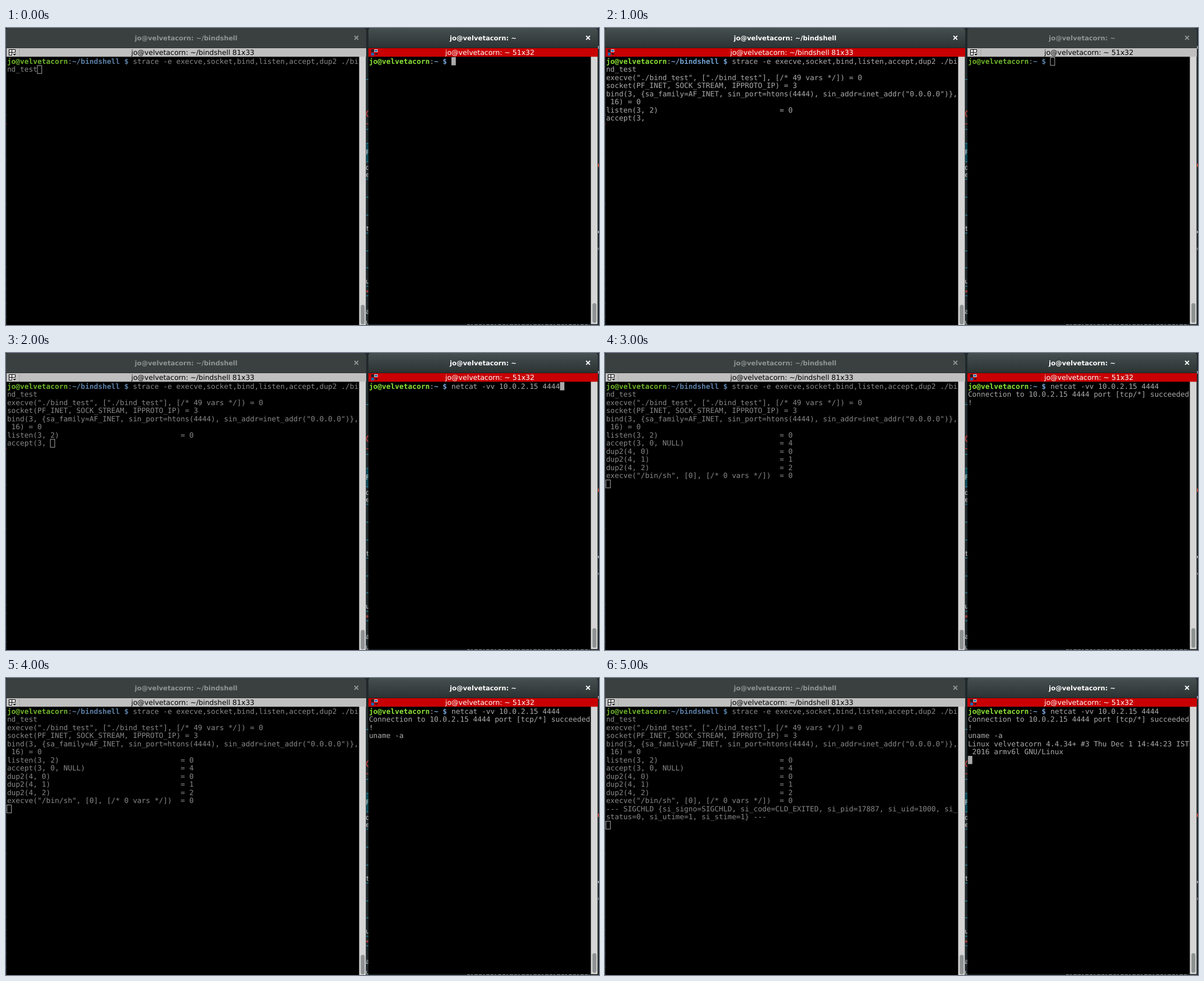
An HTML page for the animation above (6000 ms loop, 1057 by 530 pixels).

```html
<!DOCTYPE html>
<html lang="en">
<head>
<meta charset="utf-8">
<title>Bind shell</title>
<style>
html, body { margin: 0; width: 100%; height: 100%; overflow: hidden; background: #20282b; }
svg { display: block; width: 1057px; height: 530px; }
text { white-space: pre; text-rendering: geometricPrecision; }
.mono { font: 12.856px "DejaVu Sans Mono", monospace; fill: #aaa; }
.user { font-weight: bold; fill: #8ae234; }
.path { font-weight: bold; fill: #729fcf; }
.title { font: bold 11.6px "DejaVu Sans", sans-serif; text-anchor: middle; }
.sub { font: 12.5px "DejaVu Sans", sans-serif; text-anchor: middle; }
.desk { font: 12px "DejaVu Sans Mono", monospace; fill: #c8cccc; }

/* hN stays visible for N seconds, beginning at second --at */
.h1, .h2, .h3, .h4, .h5, .d1, .d5 {
  animation: 6s step-end calc((var(--at) - 6) * 1s) infinite;
}
.h1 { animation-name: h1; }
.h2 { animation-name: h2; }
.h3 { animation-name: h3; }
.h4 { animation-name: h4; }
.h5 { animation-name: h5; }
.d1 { animation-name: d1; }
.d5 { animation-name: d5; }
@keyframes h1 { 0% { visibility: visible } 16.6666%, 100% { visibility: hidden } }
@keyframes h2 { 0% { visibility: visible } 33.3333%, 100% { visibility: hidden } }
@keyframes h3 { 0% { visibility: visible } 50%, 100% { visibility: hidden } }
@keyframes h4 { 0% { visibility: visible } 66.6666%, 100% { visibility: hidden } }
@keyframes h5 { 0% { visibility: visible } 83.3333%, 100% { visibility: hidden } }
@keyframes d1 { 0% { opacity: .8 } 16.6666%, 100% { opacity: 1 } }
@keyframes d5 { 0% { opacity: .8 } 83.3333%, 100% { opacity: 1 } }
</style>
</head>
<body>
<svg id="stage" viewBox="0 0 1057 530"></svg>
<script>
const COL = 7.74, ROW = 14.5, TOP = 52;
const USER = 'jo@velvetacorn';

const rect = (x, y, w, h, fill, more = '') =>
  `<rect x="${x}" y="${y}" width="${w}" height="${h}" fill="${fill}" ${more}/>`;
const text = (x, y, cls, body, more = '') =>
  `<text x="${x}" y="${y}" class="${cls}" xml:space="preserve" ${more}>${body}</text>`;
const during = (at, secs, body) => `<g class="h${secs}" style="--at:${at}">${body}</g>`;
const row = (x, r, body) => text(x, TOP + 11.8 + r * ROW, 'mono', body);
const rows = (x, first, list) => list.map((s, i) => row(x, first + i, s)).join('');
const result = (call, value) => call.padEnd(40) + '= ' + value;
const prompt = (dir, cmd) =>
  `<tspan class="user">${USER}</tspan>:<tspan class="path">${dir} $</tspan> ${cmd}`;

const solid = (x, c, r) => rect(x + c * COL, TOP + r * ROW, 7.8, 14.6, '#aaa');
const hollow = (x, c, r) =>
  rect(x + c * COL + .5, TOP + r * ROW + .5, 7.8, 14.2, 'none', 'stroke="#aaa"');

function icon(x, lit) {
  if (lit) {
    return rect(x, 38, 5, 5, '#222') + rect(x + 5.5, 38, 6, 5, '#ddd') +
      rect(x + 6.5, 39, 4, 3, '#1565b0') + rect(x, 44, 5, 5, '#1565b0') +
      `<path d="M${x + 6} 45h6l-3 3.5z" fill="#222"/>`;
  }
  return rect(x, 38, 11, 11, '#eee') +
    `<path d="M${x + .5} 38.5h11v5h-11zM${x + 5.5} 38.5v10h-5v-5" fill="none" stroke="#000"/>` +
    `<path d="M${x + 7} 46h6l-3 3z" fill="#000"/>`;
}

function bars(w, lit) {
  const mid = w.x + w.width / 2;
  const ink = lit ? '#fff' : '#8f9494';
  const cx = w.x + w.width - 17.5;
  return `<path d="M${w.x} 36V5q0-5 5-5h${w.width - 10}q5 0 5 5v31z" fill="${lit ? 'url(#lit)' : '#3a4040'}"/>` +
    rect(w.x, 35, w.width, 1, lit ? '#1d2222' : '#2b3030') +
    text(mid, 21.6, 'title', `${USER}: ${w.dir}`, `fill="${ink}"`) +
    `<path d="M${cx - 3.4} 14l6.8 6.8m0-6.8l-6.8 6.8" stroke="${ink}" stroke-width="1.9"/>` +
    rect(w.x + w.edge, 36, w.width - w.edge, 15.3, lit ? '#c80003' : '#c0bfbf') +
    (lit ? '' : rect(w.x + 23.5, 37, 1, 14, '#a5a5a5')) +
    icon(w.x + 5, lit) +
    text(w.sub, 47.6, 'sub', `${USER}: ${w.dir} ${w.size}`, `fill="${lit ? '#fff' : '#000'}"`);
}

const left = { x: 0, width: 642, edge: 1, sub: 333, dir: '~/bindshell', size: '81x33' };
const right = { x: 646, width: 409, edge: 0, sub: 862.5, dir: '~', size: '51x32' };
const L = 1.9, R = 646.9;

function desktop() {
  const lines = [92, 181, 206, 239, 270, 302, 334, 366, 398, 428, 461, 478]
    .map(y => rect(642, y - 1, 4, 1.6, '#28788c')).join('');
  const letters = [['F', 226], ['d', 253], ['e', 266], ['t', 362], ['u', 456], ['a', 510], ['u', 529]]
    .map(([s, y]) => text(641, y, 'desk', s)).join('');
  const flecks = [154, 234, 312, 425, 448, 463, 490, 514]
    .map(y => rect(0, y, 1, 3, '#33415c')).join('');
  return rect(0, 0, 1057, 530, '#20282b') +
    `<g clip-path="url(#gap)">${rect(642, 207, 4, 32, '#0e4a58')}${lines}${letters}` +
    '<circle cx="648" cy="153" r="5.5" fill="none" stroke="#c8403c" stroke-width="1.5"/>' +
    rect(642, 170, 4, 1.5, '#b03a38') + rect(642, 468, 4, 4, '#8c3c38') + '</g>' +
    flecks + rect(0, 170, 1, 2, '#b03030') +
    rect(1055, 32, 2, 5, '#889') + rect(1055, 242, 2, 6, '#b84030') +
    rect(1055, 362, 2, 4, '#99a') + rect(1055, 392, 2, 4, '#667');
}

function scrollbar(x, thumbY, bottom) {
  return rect(x, 51, 12, bottom - 51, '#d5d5d5') +
    rect(x + 2.8, thumbY, 7, 35, '#8e9293', 'rx="3.5"');
}

const leftRows =
  rows(L, 0, [prompt('~/bindshell', 'strace -e execve,socket,bind,listen,accept,dup2 ./bi'), 'nd_test']) +
  during(1, 5, rows(L, 2, [
    'execve("./bind_test", ["./bind_test"], [/* 49 vars */]) = 0',
    'socket(PF_INET, SOCK_STREAM, IPPROTO_IP) = 3',
    'bind(3, {sa_family=AF_INET, sin_port=htons(4444), sin_addr=inet_addr("0.0.0.0")},',
    ' 16) = 0',
    result('listen(3, 2)', 0)])) +
  during(1, 2, row(L, 7, 'accept(3, ')) +
  during(3, 3, rows(L, 7, [
    result('accept(3, 0, NULL)', 4),
    ...[0, 1, 2].map(n => result(`dup2(4, ${n})`, n)),
    result('execve("/bin/sh", [0], [/* 0 vars */])', 0)])) +
  during(5, 1, rows(L, 12, [
    '--- SIGCHLD {si_signo=SIGCHLD, si_code=CLD_EXITED, si_pid=17887, si_uid=1000, si_',
    'status=0, si_utime=1, si_stime=1} ---']));

const rightRows =
  row(R, 0, prompt('~', '')) +
  during(2, 4, row(R + 19 * COL, 0, 'netcat -vv 10.0.2.15 4444')) +
  during(3, 3, rows(R, 1, ['Connection to 10.0.2.15 4444 port [tcp/*] succeeded', '!'])) +
  during(4, 2, row(R, 3, 'uname -a')) +
  during(5, 1, rows(R, 4, [
    `Linux ${USER.slice(3)} 4.4.34+ #3 Thu Dec 1 14:44:23 IST`,
    ' 2016 armv6l GNU/Linux']));

const cursors =
  during(0, 1, hollow(1.2, 7, 1) + solid(R, 19, 0)) +
  during(1, 1, hollow(646.3, 19, 0)) +
  during(2, 1, hollow(1.2, 10, 7) + solid(R, 44, 0)) +
  during(3, 2, hollow(1.2, 0, 12)) +
  during(5, 1, hollow(1.2, 0, 14) + solid(R, 0, 6));

document.getElementById('stage').innerHTML =
  `<defs>
    <linearGradient id="lit" x2="0" y2="1"><stop stop-color="#465050"/><stop offset="1" stop-color="#2b3232"/></linearGradient>
    <clipPath id="gap"><rect x="642" y="36" width="4" height="494"/></clipPath>
  </defs>` +
  desktop() +
  rect(1, 51, 641, 479, '#000') + rect(646, 51, 409, 477.5, '#000') +
  rect(646, 528.5, 409, 1.5, '#15191b') +
  '<path d="M822 529.5H1040" stroke="#8a9090" stroke-dasharray="5 2 3 3 6 2"/>' +
  scrollbar(629.5, 494, 530) + scrollbar(1042.5, 491, 528.5) +
  during(2, 5, bars(left, false) + bars(right, true)) +
  during(1, 1, bars(left, true) + bars(right, false)) +
  `<g class="d5" style="--at:2">${leftRows}</g>` +
  `<g class="d1" style="--at:1">${rightRows}</g>` +
  cursors;
</script>
</body>
</html>
```
